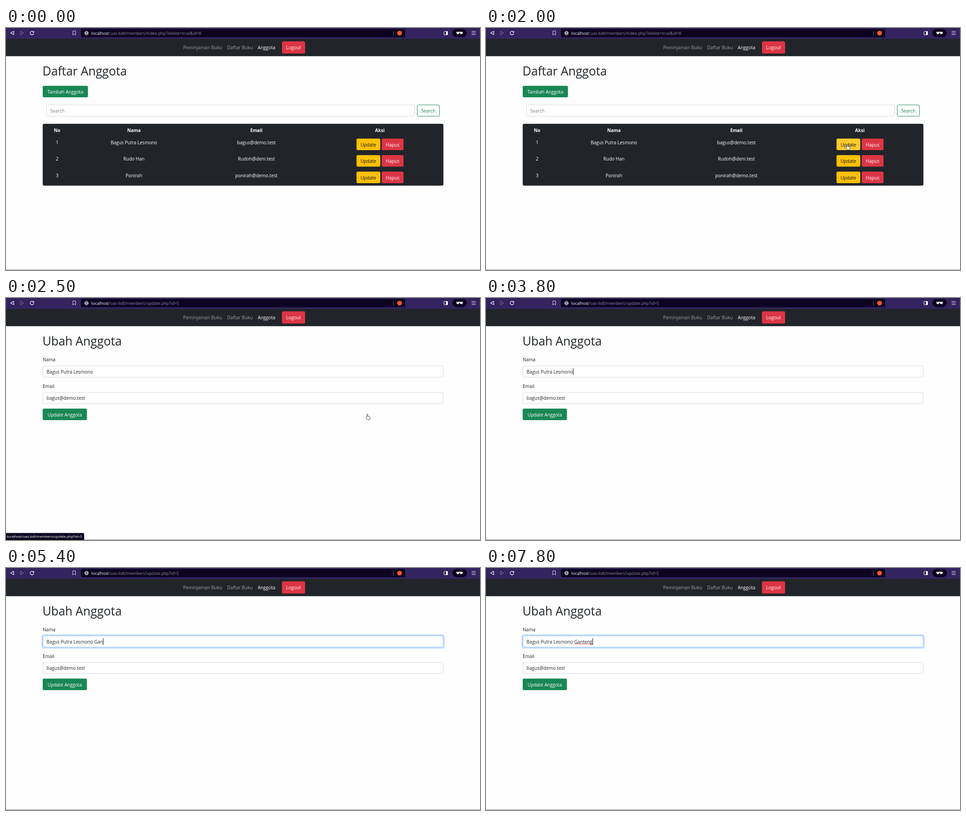
Recreate the animation shown at these times as an HTML page. Size 1046x535 px, loop 8000 ms.

```html
<!DOCTYPE html>
<html lang="id">
<head>
<meta charset="utf-8">
<title>Daftar Anggota</title>
<style>
  html, body { margin: 0; width: 100%; height: 100%; overflow: hidden; background: #fefefe; }
  svg { display: block; }
  text { font: 10.08px "Open Sans", "Noto Sans", sans-serif; white-space: pre; }
  .mid { text-anchor: middle; }
  .head { font-weight: 700; font-size: 9.9px; }
  .title { font-weight: 500; font-size: 26.4px; }
  .url { font-size: 9.15px; }
  .status { font-size: 7.84px; }
</style>
</head>
<body>
<svg id="stage" width="1046" height="535" viewBox="0 0 1046 535"></svg>
<script>
const DARK = '#212529', GREEN = '#198754', RED = '#dc3545', YELLOW = '#ffc107', GREY = '#9b9d9f';
const NAME = 'Bagus Putra Lesmono', EMAIL = 'bagus@demo.test';
const MEMBERS = [[NAME, EMAIL], ['Rudo Han', 'Rudoh@dem.test'], ['Ponirah', 'ponirah@demo.test']];

// y is the middle of the capital letters
const text = (x, y, str, fill = DARK, cls = '', more = '') =>
  `<text x="${x}" y="${y + 3.7}" fill="${fill}" class="${cls}" ${more}>${str}</text>`;
const rect = (x, y, w, h, fill, r = 0, more = '') =>
  `<rect x="${x}" y="${y}" width="${w}" height="${h}" rx="${r}" fill="${fill}" ${more}/>`;
const path = (d, stroke, more = '') => `<path d="${d}" stroke="${stroke}" fill="none" ${more}/>`;
const button = (x, y, w, h, label, fill, color = '#fff', more = '') =>
  rect(x, y, w, h, fill, 3, more) + text(x + w / 2, y + h / 2 + .7, label, color, 'mid');
const field = (x, y, w, more = '') =>
  rect(x + .5, y + .5, w - 1, 25, '#fff', 3, `stroke="#d3d8dd" ${more}`);
const title = str => `<text x="80.5" y="105.3" fill="${DARK}" class="title">${str}</text>`;

const toolbar =
  rect(0, 0, 1046, 24, '#33245f') +
  path('M17 7.2V14.8L10.3 11Z', '#fff', 'stroke-width="1.1"') +
  path('M32 7.2V14.8L38.7 11Z', '#77698f', 'stroke-width="1.1"') +
  `<g id="reload">${path('M60.6 8.6A4 4 0 1 0 61.3 12', '#fff', 'stroke-width="1.2"')}
    <path d="M62 6.4V10.2H58.2Z" fill="#fff"/></g>` +
  path('M54.6 8L60.6 14M60.6 8L54.6 14', '#fff', 'id="stop" stroke-width="1.2"') +
  path('M147.5 6.5H153.5V15.5L150.5 12.7 147.5 15.5Z', '#d8d3e6') +
  rect(165.5, 2, 715.5, 18.5, '#0c0421', 3) +
  '<circle cx="177.7" cy="11.3" r="4.6" fill="#a5a1b0"/>' +
  path('M177.7 8.6V11.8M177.7 13V14.2', '#0c0421', 'stroke-width="1.1"') +
  `<text x="188.5" y="14.7" class="url" fill="#fff">localhost<tspan id="address" fill="#8d889c"></tspan></text>` +
  rect(854.5, 6, 1, 11, '#6a6480') +
  '<circle cx="868.5" cy="11.3" r="5.3" fill="#fb542b"/>' +
  rect(966.5, 7.5, 8, 7.5, 'none', 1, 'stroke="#fff"') + rect(971, 7.5, 4, 7.5, '#fff') +
  rect(985, 2, 32, 18, '#0d0520', 9) +
  '<path d="M994 8.6H1008V10.2Q1007.6 13.6 1004.6 13.6 1002 13.4 1001.6 10.6H1000.4Q1000 13.4 997.4 13.6 994.4 13.6 994 10.2Z" fill="#fff"/>' +
  path('M1027.5 7.5H1036.5M1027.5 11H1036.5M1027.5 14.5H1036.5', '#e4e0ee');

const navbar =
  rect(0, 24, 1046, 38.3, DARK) +
  text(391, 43.6, 'Peminjaman Buku', GREY) + text(488, 43.6, 'Daftar Buku', GREY) +
  text(555.5, 43.6, 'Anggota', '#fff') +
  button(609, 29.5, 51, 27, 'Logout', RED);

const memberRow = ([name, email], i) => {
  const y = 253.2 + i * 36.5, top = y - 8.7;
  return text(112.8, y, i + 1, '#fff', 'mid') + text(282.3, y, name, '#fff', 'mid') +
    text(552.5, y, email, '#fff', 'mid') +
    button(773.5, top, 52.5, 25.5, 'Update', YELLOW, '#111', i ? '' : 'id="update"') +
    button(829, top, 48.3, 25.5, 'Hapus', RED);
};

const listPage =
  title('Daftar Anggota') +
  button(81, 127.8, 99.8, 25.5, 'Tambah Anggota', GREEN) +
  field(89, 169.5, 813) + text(97.5, 183.3, 'Search', '#7b8187') +
  rect(907.5, 170, 49, 25, '#fff', 3, `stroke="${GREEN}"`) + text(932, 183.3, 'Search', GREEN, 'mid') +
  rect(81, 211.7, 884.3, 136.8, DARK, 3.5) +
  [[112.8, 'No'], [282.3, 'Nama'], [552.5, 'Email'], [825, 'Aksi']]
    .map(([x, label]) => text(x, 226, label, '#fff', 'mid head')).join('') +
  rect(771.8, 242.8, 55.9, 28.9, 'none', 4.5, 'id="updateRing" stroke="#d9a406" stroke-opacity=".55" stroke-width="2.7"') +
  MEMBERS.map(memberRow).join('');

const formPage =
  title('Ubah Anggota') +
  text(81, 136.4, 'Nama') +
  rect(79.6, 148.1, 887.1, 28.8, 'none', 4.5, 'id="nameRing" stroke="#c2dbfe" stroke-width="2.8"') +
  field(81, 149.5, 884.3, 'id="nameField"') +
  text(89.5, 163, '', DARK, '', 'id="name"') +
  path('', '#e33', 'id="squiggle" stroke-width=".9"') +
  rect(0, 155, 1, 15, '#111', 0, 'id="caret"') +
  text(81, 194.8, 'Email') + field(81, 208, 884.3) + text(89.5, 221.5, EMAIL) +
  button(81, 244.5, 97.6, 25.5, 'Update Anggota', GREEN);

const overlay =
  rect(0, 534, 1046, 1, '#858488') +
  `<g id="status"><path d="M0 519.5H170Q172.5 519.5 172.5 522V535H0Z" fill="#0d0a20"/>
    <text x="1.8" y="529.9" class="status" fill="#fff">localhost/uas-bdt/members/update.php?id=5</text></g>` +
  `<g id="pointer" fill="#fff" stroke="#111" stroke-width=".8" stroke-linejoin="round">
    <path id="arrow" d="M0 0V9L2.1 7.1 3.5 10.2 5 9.5 3.7 6.5H6.5Z"/>
    <path id="hand" d="M-1 6.5V.2a1 1 0 0 1 2 0V4.4L5 5.4Q6.2 5.8 6 7L5.5 10Q5 12 3.4 12.2H.8Q0 11.5-2.8 8.2-3.6 6.8-2.4 6.4Z"/></g>`;

document.getElementById('stage').innerHTML =
  rect(0, 0, 1046, 535, '#fefefe') + toolbar + navbar +
  `<g id="list">${listPage}</g><g id="form">${formPage}</g>` + overlay;

const $ = id => document.getElementById(id);
const show = (id, on) => $(id).style.display = on ? '' : 'none';
const within = (t, a, b) => t >= a && t < b;

const ROUTE = [[400, 28, 1], [600, 220, 170], [800, 390, 281], [1000, 436, 264], [1100, 436, 264],
  [1400, 703, 253], [1700, 786, 260], [2000, 797.5, 257.2], [2700, 797.5, 257.2], [3200, 290, 172]];
const KEYS = [4700, 5100, 5300, 5400, 5900, 6200, 6400, 6700];

function pointerAt(t) {
  const i = ROUTE.findIndex(p => p[0] > t);
  if (i < 1) return null;
  const [a, b] = [ROUTE[i - 1], ROUTE[i]], k = (t - a[0]) / (b[0] - a[0]);
  return [a[1] + (b[1] - a[1]) * k, a[2] + (b[2] - a[2]) * k];
}

function drawList(t) {
  const hover = Math.min(1, Math.max(0, (t - 1600) / 150));
  $('update').setAttribute('fill', `rgb(255,${193 + 9 * hover},${7 + 37 * hover})`);
  show('updateRing', t >= 2200);
}

function drawForm(t) {
  const typed = KEYS.filter(k => k <= t).length;
  const focus = Math.min(1, Math.max(0, (t - 3800) / 150));
  const label = $('name');
  label.textContent = NAME;
  const start = 89.5 + label.getComputedTextLength() + 2.6;
  label.textContent = NAME + ' Ganteng'.slice(0, typed);
  const end = 89.5 + label.getComputedTextLength();
  $('nameRing').style.opacity = focus;
  $('nameField').style.stroke = focus ? `color-mix(in srgb, #86b7fe ${focus * 100}%, #d3d8dd)` : '';
  $('caret').setAttribute('x', Math.round(end));
  show('caret', within(t, 3800, 4300) || within(t, 4700, 7200) || t >= 7700);
  show('squiggle', t >= 7800);
  let wave = `M${start} 169`;
  for (let x = start, up = true; x < end; x += 1.5, up = !up) wave += `l1.5 ${up ? -1.6 : 1.6}`;
  $('squiggle').setAttribute('d', wave);
}

function frame() {
  const t = Math.floor(performance.now() % 8000 / 100) * 100;
  const onForm = t >= 2500, loading = within(t, 2300, 2500);
  show('list', !onForm);
  show('form', onForm);
  show('reload', !loading);
  show('stop', loading);
  show('status', within(t, 2200, 2900));
  $('address').textContent = '/uas-bdt/members/' + (onForm ? 'update.php?id=5' : 'index.php?delete=true&id=8');
  onForm ? drawForm(t) : drawList(t);

  const pos = pointerAt(t), onButton = within(t, 1700, 2800);
  show('pointer', pos);
  show('hand', onButton);
  show('arrow', !onButton);
  if (pos) $('pointer').setAttribute('transform', `translate(${pos})`);
  requestAnimationFrame(frame);
}
frame();
</script>
</body>
</html>
```
